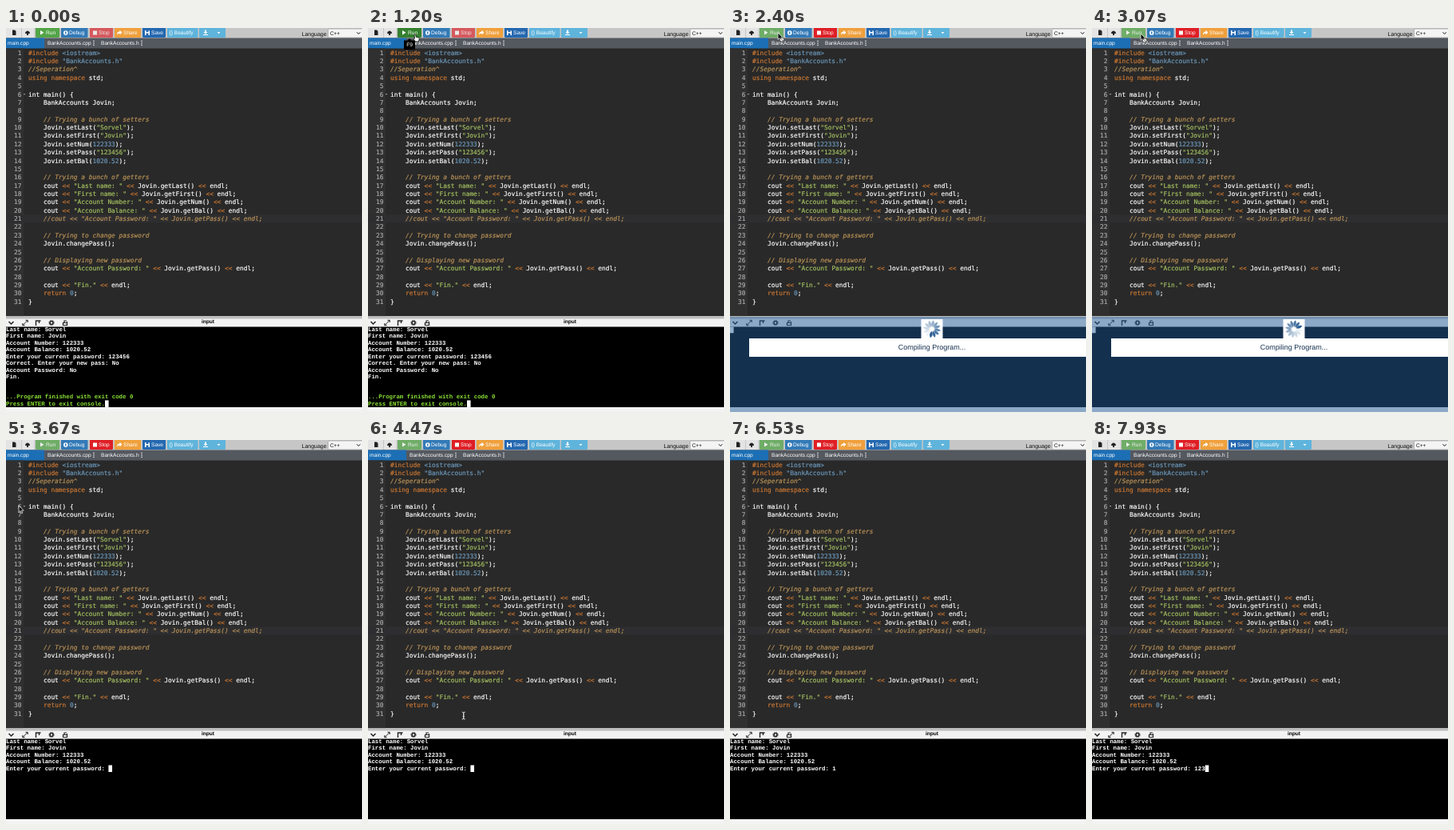
An HTML page for the animation above (8000 ms loop, 446x480 px).

```html
<!DOCTYPE html>
<html lang="en">
<head>
<meta charset="utf-8">
<title>Code editor running a program</title>
<style>
html, body { margin: 0; width: 100%; height: 100%; overflow: hidden; background: #f2f2f2; }
svg { display: block; width: 446px; height: 480px; }
text { white-space: pre; text-rendering: geometricPrecision; }
.ui { font: 6.6px "Liberation Sans", Arial, sans-serif; }
.code { font: 7.86px "DejaVu Sans Mono", monospace; color: #fff; }
.code text, .code tspan { fill: currentColor; stroke: currentColor; stroke-width: .18; }
.con { font: bold 7.38px "Liberation Mono", "Courier New", monospace; fill: #fff; }
.comment { color: #bc9458; font-style: italic; }
.key { color: #cc7833; }
.str { color: #a5c261; }
.num { color: #6c99bb; }
.number { color: #aaa; }
.line { fill: none; stroke-width: 1; }
</style>
</head>
<body>
<svg viewBox="0 0 446 480">
  <rect width="446" height="13" fill="#c6c6c6"/>
  <g id="toolbar"></g>

  <rect y="12.5" width="446" height="13.5" fill="#54585f"/>
  <rect y="12.5" width="48" height="13.5" fill="#1c6fb5"/>
  <g class="ui" fill="#fff">
    <text x="2" y="21.2">main.cpp</text>
    <text x="52" y="21.2">BankAccounts.cpp</text>
    <text x="119" y="21.2">BankAccounts.h</text>
    <path d="M110 15.8v6.4M170 15.8v6.4" stroke="#fff" stroke-width="1.3" stroke-dasharray="1.3 1.2"/>
  </g>

  <rect y="25.5" width="446" height="335" fill="#292929"/>
  <rect y="25.5" width="22" height="335" fill="#303030"/>
  <rect y="233.2" width="446" height="10.4" fill="#2e2e30"/>
  <g id="code" class="code"></g>
  <path d="M21.5 82h3l-1.5 2z" fill="#888"/>

  <rect y="360.5" width="446" height="120" fill="#f3f3f3"/>
  <rect y="360.5" width="446" height="3" fill="#bdbdbd"/>
  <rect y="373.5" width="446" height="100.5" fill="#000"/>
  <clipPath id="clip"><rect y="373.5" width="446" height="100.5"/></clipPath>
  <g clip-path="url(#clip)">
    <g id="console" class="con"></g>
    <rect id="caret" width="4.6" height="8.5" fill="#fff"/>
  </g>
  <g class="line" stroke="#222">
    <path d="M3.5 367l3 3 3-3" stroke-width="1.5"/>
    <path d="M21 371.5l6-6M20.8 369v2.7h2.7M24.5 365.3h2.7v2.7"/>
    <path d="M37.5 372v-6h4v3M37.5 366h6" stroke-width="1.4"/>
    <circle cx="57" cy="368.5" r="2" stroke-width="1.6"/>
    <circle cx="57" cy="368.5" r="3.2" stroke-dasharray="1.2 1.3"/>
    <path d="M71.5 371.5h5v-3h-5zM73 368.5v-2.5h3M76.5 367v4" stroke-width="1.2"/>
  </g>
  <text class="ui" x="253" y="369.3" text-anchor="middle" style="font-weight:bold">input</text>

  <g id="compile">
    <rect y="361" width="446" height="119" fill="rgb(40,96,158)" opacity=".5"/>
    <rect x="239.5" y="364" width="27" height="25" fill="#fff"/>
    <g id="petals" transform="translate(253 376.3)" fill="#2b5f93"></g>
    <rect x="24" y="388" width="422" height="23" fill="#fff"/>
    <text x="253" y="402.3" text-anchor="middle" fill="#14304f"
      style="font:9px 'Liberation Sans',Arial,sans-serif">Compiling Program...</text>
  </g>

  <g id="tip">
    <path d="M45 15.5h4.5l2.5-2.5 2.5 2.5h4.5v11.5h-14z" fill="#000"/>
    <text class="ui" x="52" y="23.3" text-anchor="middle" fill="#fff">F9</text>
  </g>
  <g id="mouse">
    <path id="arrow" d="M0 0v8.4l2-1.8 1.4 3.2 1.5-.7-1.4-3h2.7z" fill="#111" stroke="#fff" stroke-width=".7"/>
    <g id="denied" class="line">
      <circle cx="5" cy="8.5" r="2.6" fill="#fff" stroke="#555"/>
      <path d="M3.2 6.7l3.6 3.6" stroke="#555"/>
    </g>
    <path id="hand" d="M-1 0q1-1 1.6.3l.6 3 3 .6q1.3.5 1 2l-.8 3h-4l-2.6-3.4q0-1 1.7-.2z" fill="#fff" stroke="#111" stroke-width=".8"/>
    <path id="beam" class="line" d="M-2-4.5q2 0 2 1v7q0 1-2 1M2-4.5q-2 0-2 1v7q0 1 2 1M-1 1h2" stroke="#ddd"/>
  </g>
</svg>
<script>
const LOOP = 8000, CLICK = 1800, READY = 3350;
const $ = id => document.getElementById(id);
const show = (id, on) => $(id).setAttribute("visibility", on ? "inherit" : "hidden");
const escape = s => s.replace(/&/g, "&amp;").replace(/</g, "&lt;");

// Toolbar: id, x, width, colour, label, label x, icon path, ink
const buttons = [
  ["file", 0, 19, "#e4e4e4", "", 0, "M8 2.5h3l1.5 1.5v5h-4.5z", "#222"],
  ["upload", 20, 15.5, "#e4e4e4", "", 0, "M24 7q0-3 3-3.5 3 .5 3 3.5h-2v2h-2v-2z", "#222"],
  ["run", 37, 30, "#449d3c", "Run", 50, "M43 3l4.5 2.8-4.5 2.8z", "#fff"],
  ["debug", 69, 33.5, "#337ab7", "Debug", 79, "M72 6a2.8 2.8 0 1 0 5.6 0a2.8 2.8 0 1 0-5.6 0M74 4.5h1.5v3h-1.5z", "#fff"],
  ["stop", 105, 29, "#df1f26", "Stop", 116, "M109 3.5h5v5h-5z", "#fff"],
  ["share", 136, 33, "#f0a03c", "Share", 147, "M139 8.5q0-4 3.5-4v-1.7l3 2.8-3 2.8v-1.8q-2 0-3.5 1.9z", "#fff"],
  ["save", 171, 29, "#2468b0", "Save", 182, "M174 3h5l1 1v5h-6zM175.5 3v2h3v-2zM175.5 6.5v2.5h3v-2.5z", "#fff"],
  ["beautify", 202, 38.5, "#5fb4dc", "{} Beautify", 204.5, "", "#fff"],
  ["download", 242, 33, "#5fb4dc", "", 0, "M249 2.5h2v2.5h1.5l-2.5 2.5-2.5-2.5h1.5zM247 8h6v1h-6zM264.5 5h4l-2 2.2z", "#fff"]
];
$("toolbar").innerHTML = buttons.map(([id, x, w, color, label, tx, icon, ink]) =>
  `<g id="${id}" class="ui" fill="${ink}">
    <rect x="${x}" y="-3" width="${w}" height="15" rx="1.5" fill="${color}"/>
    <path d="${icon}" fill-rule="evenodd"/><text x="${tx}" y="8.2">${label}</text></g>`).join("") +
  `<text x="370.5" y="9.6" fill="#111" class="ui" style="font-size:7px">Language</text>
   <rect x="403.5" y="1" width="44" height="11" rx="1.5" fill="#f4f4f4" stroke="#999" stroke-width=".7"/>
   <text x="406" y="8.8" fill="#111" class="ui">C++</text>
   <path d="M439.5 5.3l2.2 2.2 2.2-2.2" class="line" stroke="#111"/>`;

const source = `#include <iostream>
#include "BankAccounts.h"
//Seperation^
using namespace std;

int main() {
    BankAccounts Jovin;

    // Trying a bunch of setters
    Jovin.setLast("Sorvel");
    Jovin.setFirst("Jovin");
    Jovin.setNum(122333);
    Jovin.setPass("123456");
    Jovin.setBal(1020.52);

    // Trying a bunch of getters
    cout << "Last name: " << Jovin.getLast() << endl;
    cout << "First name: " << Jovin.getFirst() << endl;
    cout << "Account Number: " << Jovin.getNum() << endl;
    cout << "Account Balance: " << Jovin.getBal() << endl;
    //cout << "Account Password: " << Jovin.getPass() << endl;

    // Trying to change password
    Jovin.changePass();

    // Displaying new password
    cout << "Account Password: " << Jovin.getPass() << endl;

    cout << "Fin." << endl;
    return 0;
}`;
const tokens = /(?<comment>\/\/.*)|(?<key>#include|<<|\b(?:using|namespace|return)\b)|(?<num><\w+>|"\w+\.h"|\b\d[\d.]*)|(?<str>"[^"]*")|[^]/g;
const highlight = line => [...line.matchAll(tokens)].map(m => {
  const kind = Object.keys(m.groups).find(k => m.groups[k]);
  return kind ? `<tspan class="${kind}">${escape(m[0])}</tspan>` : escape(m[0]);
}).join("");
$("code").innerHTML = source.split("\n").map((line, i) => {
  const y = 33.7 + i * 10.37;
  return `<text class="number" x="19.5" y="${y}" text-anchor="end">${i + 1}</text>
    <text x="28" y="${y}">${highlight(line)}</text>`;
}).join("");

const details = ["Last name: Sorvel", "First name: Jovin", "Account Number: 122333", "Account Balance: 1020.52"];
const prompt = "Enter your current password: ";
const finished = [...details, prompt + "123456", "Correct. Enter your new pass: No",
  "Account Password: No", "Fin.", "", "", "...Program finished with exit code 0", "Press ENTER to exit console."];
const keyTimes = [6000, 6700, 7500];

let printed;
function drawConsole(t) {
  const typed = keyTimes.filter(k => t >= k).length;
  const lines = t < CLICK ? finished : t < READY ? [""] : [...details, prompt + "123".slice(0, typed)];
  const key = lines.join("\n");
  if (key !== printed) {
    printed = key;
    $("console").innerHTML = lines.map((line, i) =>
      `<text y="${379 + i * 8.42}"${i > 9 ? ' fill="#8ae234"' : ""}>${line}</text>`).join("");
  }
  const last = lines.length - 1;
  $("caret").setAttribute("x", lines[last].length * 4.428);
  $("caret").setAttribute("y", 372.8 + last * 8.42);
  const since = t < CLICK ? t : t < READY ? 0 : t - (typed ? keyTimes[typed - 1] : READY);
  show("caret", since % 1000 < 500);
}

// Pointer path: time, x, y
const path = [[450, -6, 70], [1000, 59, 8], [1750, 59, 8], [1850, 60, 6], [2500, 60, 6], [2900, 61, 7],
  [3150, 61, 7], [3580, 16, 82], [3750, 16, 82], [4350, 110, 330], [4850, 176, 429], [5900, 176, 429]];
function pointerAt(t) {
  const i = path.findIndex(p => p[0] > t);
  if (i < 1) return null;
  const [a, b] = [path[i - 1], path[i]];
  const u = (t - a[0]) / (b[0] - a[0]), e = u * u * (3 - 2 * u);
  return [a[1] + (b[1] - a[1]) * e, a[2] + (b[2] - a[2]) * e];
}

function drawPointer(t) {
  const at = pointerAt(t);
  show("mouse", at);
  if (!at) return;
  const [x, y] = at;
  const onRun = x > 37 && x < 67 && y < 12;
  const beam = y > 374 || (x > 24 && y > 26 && y < 360);
  $("mouse").setAttribute("transform", `translate(${x} ${y})`);
  show("hand", onRun && t < CLICK);
  show("denied", onRun && t >= CLICK);
  show("beam", beam);
  show("arrow", !beam && !(onRun && t < CLICK));
}

const PETALS = 12;
$("petals").innerHTML = Array.from({ length: PETALS }, (_, i) =>
  `<path d="M0-2.5Q4.5-6 2-11Q-2-8.5 0-2.5z" transform="rotate(${i * 360 / PETALS})"/>`).join("");

function draw(t) {
  const started = t >= CLICK, compiling = started && t < READY;
  $("run").setAttribute("opacity", started ? .75 : 1);
  $("stop").setAttribute("opacity", started ? 1 : .65);
  $("run").firstElementChild.setAttribute("fill", t > 950 && !started ? "#35802f" : "#53a548");
  show("tip", t > 1050 && t < 2300);
  show("compile", compiling);
  const step = Math.floor(t / 80);
  [...$("petals").children].forEach((petal, i) =>
    petal.setAttribute("opacity", 1 - ((step - i + PETALS * 20) % PETALS) / PETALS));
  drawConsole(t);
  drawPointer(t);
}

const start = performance.now();
function tick() {
  draw((performance.now() - start) % LOOP);
  requestAnimationFrame(tick);
}
tick();
</script>
</body>
</html>
```
